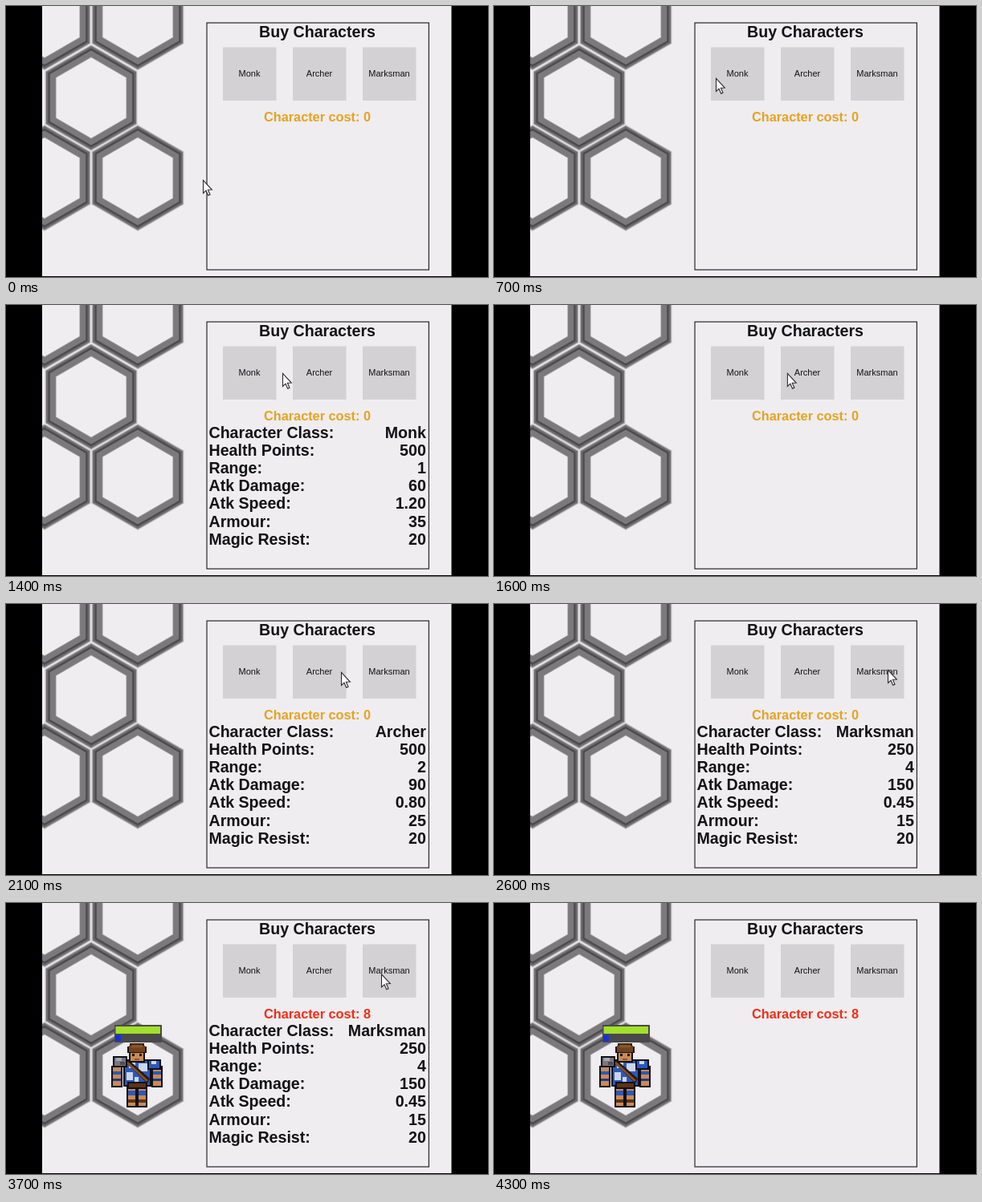
Animation, 600 px wide and 338 px high, one loop 4400 ms. Source, as an HTML page with a canvas:

```html
<!DOCTYPE html>
<html lang="en">
<head>
<meta charset="utf-8">
<title>Buy Characters</title>
<style>
html, body { margin: 0; width: 100%; height: 100%; overflow: hidden; background: #000; }
canvas { display: block; width: 600px; height: 338px; }
</style>
</head>
<body>
<canvas id="stage" width="600" height="338"></canvas>
<script>
const ctx = document.getElementById('stage').getContext('2d');
const LOOP = 4400, STEP = 100;
const BG = '#efedf0', INK = '#121114';
const FONT = '"Liberation Sans", Arial, sans-serif';

const LABELS = ['Character Class:', 'Health Points:', 'Range:', 'Atk Damage:',
  'Atk Speed:', 'Armour:', 'Magic Resist:'];
const UNITS = [
  { x: 270, from: 800, to: 1500, stats: ['Monk', '500', '1', '60', '1.20', '35', '20'] },
  { x: 357, from: 1700, to: 2300, stats: ['Archer', '500', '2', '90', '0.80', '25', '20'] },
  { x: 444, from: 2500, to: 3800, stats: ['Marksman', '250', '4', '150', '0.45', '15', '20'] }
];
const BOUGHT = 3500, CURSOR_END = 4200;

// time, x, y of the pointer tip
const PATH = [
  [0, 245, 217], [250, 212, 184], [450, 234, 130], [700, 276, 90],
  [1000, 308, 87], [1400, 344, 85], [2100, 417, 85], [2600, 490, 82],
  [3300, 482, 80], [3600, 480, 82], [4000, 428, 108], [4400, 428, 108]
];

function box(x, y, w, h, color) {
  ctx.fillStyle = color;
  ctx.fillRect(x, y, w, h);
}

function poly(points, color) {
  ctx.beginPath();
  points.forEach(([x, y]) => ctx.lineTo(x, y));
  ctx.closePath();
  ctx.fillStyle = color;
  ctx.fill();
}

function text(str, x, y, font, align = 'left', color = INK) {
  ctx.font = `${font} ${FONT}`;
  ctx.textAlign = align;
  ctx.fillStyle = color;
  ctx.fillText(str, x, y);
}

function hex(cx, cy) {
  const rings = [[57.3, '#b3b1b4'], [56, '#6f6d70'], [53.6, '#4d4b4e'],
    [51.2, '#7b797c'], [44.3, '#99979a'], [43.5, BG]];
  for (const [half, color] of rings) {
    const r = half / Math.cos(Math.PI / 6);
    const points = [];
    for (let i = 0; i < 6; i++) {
      const a = Math.PI / 6 + i * Math.PI / 3;
      points.push([cx + r * Math.cos(a), cy + r * Math.sin(a)]);
    }
    poly(points, color);
  }
}

function board() {
  hex(48, 14);
  hex(164, 14);
  hex(106, 114.5);
  hex(48, 214.5);
  hex(164, 214.5);
}

function panel(t) {
  ctx.strokeStyle = '#29272a';
  ctx.lineWidth = 1.2;
  ctx.strokeRect(250, 21, 276.4, 308);
  text('Buy Characters', 387.5, 39, 'bold 19.6px', 'center');
  for (const unit of UNITS) {
    box(unit.x, 51.5, 66.5, 66.5, '#d3d1d4');
    text(unit.stats[0], unit.x + 33, 88, '11px', 'center');
  }
  const paid = t >= BOUGHT;
  text('Character cost: ' + (paid ? 8 : 0), 387.5, 144, 'bold 16.3px', 'center',
    paid ? '#f42c14' : '#e6a31f');

  const shown = UNITS.find(u => t >= u.from && t < u.to);
  if (!shown) return;
  LABELS.forEach((label, i) => {
    const y = 166 + i * 22.1;
    text(label, 252.5, y, 'bold 19.6px');
    text(shown.stats[i], 522.8, y, 'bold 19.6px', 'right');
  });
}

function bars() {
  box(135, 152, 59, 22, '#4a484b');
  box(136.5, 154, 55.5, 9, '#a2e02b');
  box(136, 164.5, 7, 8, '#1730d8');
}

// Black-edged block
function block(x, y, w, h, color) {
  box(x, y, w, h, '#101018');
  box(x + 2, y + 2, w - 4, h - 4, color);
}

function fighter() {
  const blue = '#2d58b8', pale = '#c9d6ee', skin = '#c98a55', brown = '#5c3318';
  const steel = '#77777f';
  // Arms
  block(131, 203, 14, 27, skin);
  block(181, 203, 14, 27, skin);
  box(133, 210, 10, 4, blue);
  box(183, 210, 10, 4, blue);
  box(133, 219, 10, 3, '#203a86');
  box(183, 219, 10, 3, '#203a86');
  // Legs
  block(150, 228, 13, 27, skin);
  block(163, 228, 13, 27, skin);
  box(152, 234, 9, 6, blue);
  box(165, 234, 9, 6, blue);
  box(152, 245, 9, 4, brown);
  box(165, 245, 9, 4, brown);
  // Torso
  block(146, 195, 35, 34, blue);
  box(153, 199, 8, 7, pale);
  box(165, 200, 11, 10, pale);
  box(150, 211, 8, 10, pale);
  box(160, 217, 5, 6, pale);
  box(168, 213, 5, 3, '#7fa4e2');
  poly([[148, 198], [153, 196], [179, 219], [176, 225]], '#2a170e');
  poly([[149, 199], [152, 198], [177, 221], [175, 223]], '#81502b');
  // Shoulders
  block(133, 191, 18, 14, steel);
  box(137, 193, 7, 4, '#a9a9b0');
  box(142, 198, 6, 4, '#4d4d55');
  block(176, 195, 17, 13, blue);
  box(181, 197, 6, 4, pale);
  // Belt
  block(151, 223, 25, 9, brown);
  // Head
  block(153, 178, 20, 21, skin);
  box(151, 179, 24, 8, '#1d100a');
  box(154, 175, 18, 5, '#1d100a');
  box(153, 178, 20, 8, '#71431f');
  box(156, 176.5, 14, 4, '#875427');
  box(157, 188, 3, 3, '#18131a');
  box(166, 188, 3, 3, '#18131a');
  box(160, 194, 6, 2, '#8a5433');
}

function pointer(t) {
  if (t >= CURSOR_END) return;
  const i = PATH.findIndex(p => p[0] > t);
  const [t0, x0, y0] = PATH[i - 1], [t1, x1, y1] = PATH[i];
  const k = (t - t0) / (t1 - t0);
  ctx.save();
  ctx.translate(x0 + (x1 - x0) * k, y0 + (y1 - y0) * k);
  poly([[0.5, 0.5], [0.5, 16.5], [4, 13.2], [6.7, 19.3], [9, 18.2],
    [6.4, 12.3], [11.3, 12.1]], '#fff');
  ctx.strokeStyle = '#2b2a2d';
  ctx.lineWidth = 1.1;
  ctx.stroke();
  ctx.restore();
}

function draw(t) {
  box(0, 0, 600, 338, '#000');
  ctx.save();
  ctx.beginPath();
  ctx.rect(45, 0, 509.5, 337);
  ctx.clip();
  box(45, 0, 510, 338, BG);
  board();
  panel(t);
  if (t >= BOUGHT) {
    bars();
    fighter();
  }
  pointer(t);
  ctx.restore();
}

const start = performance.now();
function tick() {
  const t = (performance.now() - start) % LOOP;
  draw(Math.floor(t / STEP) * STEP);
  requestAnimationFrame(tick);
}
tick();
</script>
</body>
</html>
```
